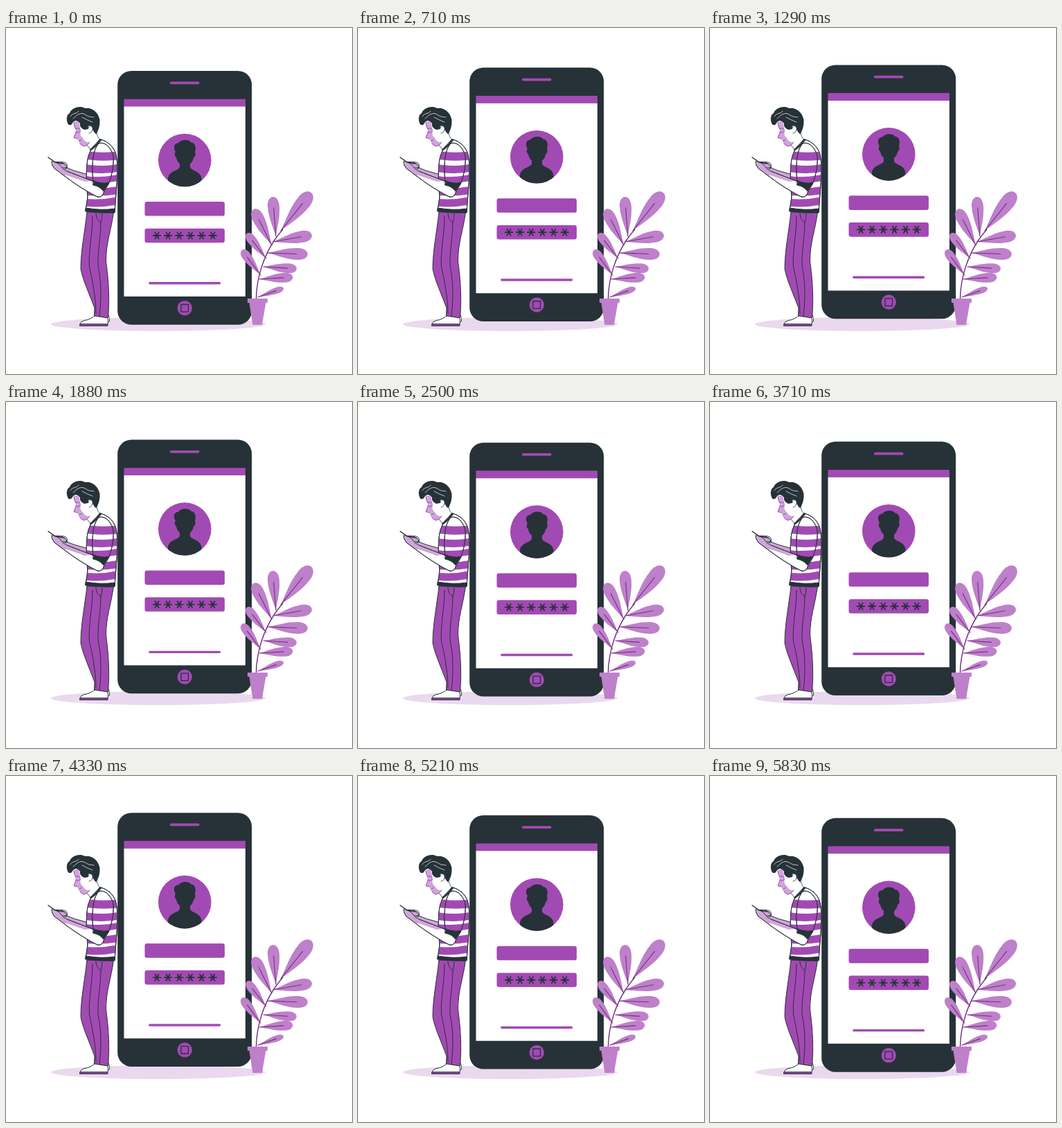
These frames come from a looping animation (500 px wide and 500 px high, 5.87 s). An HTML page:

```html
<!DOCTYPE html>
<html lang="en">
<head>
<meta charset="utf-8">
<title>Login screen</title>
<style>
  html, body { margin: 0; height: 100%; overflow: hidden; background: #fff; }
  svg { display: block; width: 100vw; height: 100vh; }
  .dark { fill: #263238; }
  .main { fill: #a24ab3; }
  .tint { fill: #d0a5d9; }
  .leaf { fill: #be80ca; }
  .white { fill: #fff; }
  .ink { stroke: #263238; stroke-linecap: round; stroke-linejoin: round; }
  .line { fill: none; }
  .vein { fill: none; stroke: #743080; stroke-width: 1.1; stroke-linecap: round; }
</style>
</head>
<body>
<svg viewBox="0 0 500 500">
  <defs>
    <clipPath id="disc"><circle cx="258.3" cy="191" r="38.3"/></clipPath>
    <clipPath id="torsoClip"><path id="torso" d="M136 161C146 163 156 171 159 183C162 196 161 216 159 240L157 266Q136 268 115 264L118 244C116 226 115 200 119 185L123 175Z"/></clipPath>
    <clipPath id="sleeveClip"><path id="sleeve" d="M134 167C143 163 153 174 155 186C156 202 152 215 148 226L126 222C124 205 124 176 134 167Z"/></clipPath>
    <g id="stripes" fill="none" stroke="#a24ab3">
      <path stroke-width="12" d="M112 183Q138 188 164 184"/>
      <path stroke-width="11" d="M112 202Q138 207 164 202"/>
      <path stroke-width="9" d="M112 218Q138 222 164 216"/>
      <path stroke-width="11" d="M112 236Q138 239 164 234M112 252Q138 255 164 249"/>
    </g>
  </defs>

  <ellipse cx="220" cy="428" rx="155" ry="10" fill="#ead9ee"/>

  <g id="phone">
    <rect class="dark" x="161.2" y="62" width="194" height="366.8" rx="20"/>
    <rect class="main" x="237" y="77.4" width="42.5" height="3.8" rx="1.9"/>
    <path class="white" d="M170.5 113H346V388H170.5Z"/>
    <path class="main" d="M170.5 102.7H346V113.5H170.5Z"/>
    <circle class="main" cx="258.3" cy="191" r="38.3"/>
    <path class="dark" clip-path="url(#disc)" d="M234 232V218C235 206 249 207 251 201V196C248 194 246.500 190 246 187C243 185 243.500 181 245 179C241 173 243 166 249 166.500C252 161 264 160 267 165C274 166 275 173 273 179C274.500 182 273.500 186 271 187.500C270.500 191 269 194 266 196.500V201C268 207 281.500 206 282.500 218V232Z"/>
    <rect class="main" x="200.5" y="250.900" width="115.500" height="20.700" rx="3.2"/>
    <rect class="main" x="200.5" y="289.700" width="115.500" height="20.600" rx="3.2"/>
    <path id="stars" class="ink line" stroke-width="1.8"/>
    <rect class="main" x="206.2" y="367.1" width="104" height="3.4" rx="1.7"/>
    <circle class="main" cx="258.3" cy="404.8" r="10.6"/>
    <path class="ink line" stroke-width="1.3" d="M253 399.500H263.500V410.100H253Z"/>
  </g>

  <g id="plant">
    <path class="vein" style="stroke-width:1.4" d="M361.500 392C362 358 374 328 387 308Q393 299 400 291"/>
    <path class="leaf" d="M349 391H378V397H375.500L370 429H356.500L351.500 397H349Z"/>
  </g>

  <g class="ink" stroke-width="1">
    <!-- shoes and trousers -->
    <path class="white" d="M145 411Q150 414 149.500 424L142 427Z"/>
    <path class="main" d="M117 266H155.500C152 293 144.500 310 144.500 337C147 356 150 382 148 413L147 419L127.500 416L128 405C121 385 111 365 108 348C108 322 114 294 117 266Z"/>
    <path class="line" d="M125 272C125 299 119 322 120.500 345C125 366 130 390 130 413M137 280C137 304 132 324 133 344C138 367 138 391 135 417M130 268Q130 277 137 281Q139 276 139 269"/>
    <path class="white" d="M128 416L147 419Q148 424 147 428H107Q107 425 112 423Q123 421 128 416Z"/>
    <path class="main" d="M107 428H147V430.500H107Z"/>

    <!-- far arm -->
    <path class="tint" d="M119 212L98 206L88 202L82 207L118 222Z"/>

    <!-- neck and face -->
    <path class="white" stroke-width=".8" d="M116 168L123 177L137 162Q131 158 131 149L121 146Z"/>
    <path class="white" stroke="none" d="M98 136Q98 142 101 146Q101 152 98 158.500L103 160L105 164Q107 170 113 171Q119 170 123 163L127 149L117 137L105 132Z"/>
    <path class="tint" stroke="none" d="M98 136Q98 142 101 146Q101 152 98 158.500L103 160L105 164Q107 170 113 171Q118 170 121 165Q114 166 111 159Q106 156 108 148L105 134Z"/>
    <path class="line" stroke="#8f3da0" stroke-width=".9" d="M98 137Q98 142 101 146M101 150Q104 153 107.500 149M101 145.500Q104 143.500 106.500 146M101 151L98 158.500L103 160M106 163L109 161.500M107 167Q109 170 113 171Q118 170 121 165"/>

    <!-- hair -->
    <path class="dark" stroke="none" d="M90 139.500C86 132 88 125 92 123C94 116 106 111 114 116C125 114 134 123 135.500 133C136 143 133 149 130 153.500C127 151 125 147 124 143C120 139 118 142 119 146L113 147Q106 144 107 138Q102 131 97 136Q94 142 90 139.500Z"/>
    <path class="line" stroke="#fff" stroke-width=".7" d="M93 128C96 122 102 125 105 120M97 131C104 124 109 121 116 126C120 129 123 128 127 129M110 129Q117 133 125 136"/>
    <path class="white" stroke-width=".8" d="M119 145C120 139 126 141 125 147Q124 152 120 152"/>

    <!-- shirt -->
    <use href="#torso" class="white"/>
    <use href="#stripes" clip-path="url(#torsoClip)"/>
    <use href="#torso" class="line"/>
    <path class="dark" d="M115.500 260Q137 264 157.500 261L157 267Q136 268 115 265Z"/>
    <path class="line" stroke-width="2.4" d="M122.500 176Q130 171 137 161.500"/>

    <!-- near arm, hands and handset -->
    <path class="white" d="M127 222L88 207L81 204L88 202Q90 196 84 194L66 193Q66 198 70 203L82 212Q108 232 132 244Q139 246 142 236L148 226Z"/>
    <path class="tint" stroke="none" d="M67 193.500L84 194.500Q89 197 87.500 202L81 204L88 207.500L122 221L114 222L88 213L84 213L70 202.500Z"/>
    <path class="line" d="M66 193Q66 198 70 203L82 212Q108 232 132 244Q139 246 142 236M127 222L88 207M72 194Q78 196 81 202L88 202M79 194Q87 196 88 202"/>
    <path class="line" stroke-width="1.5" d="M61 187L71 194L83 196"/>
    <use href="#sleeve" class="white"/>
    <use href="#stripes" clip-path="url(#sleeveClip)"/>
    <use href="#sleeve" class="line"/>
    <path class="dark" d="M126.500 221Q138 226 149 223L141 236Q136 229 126 227Z"/>
  </g>
</svg>
<script>
const add = (parent, cls, d, transform) => {
  const path = document.createElementNS("http://www.w3.org/2000/svg", "path");
  path.setAttribute("class", cls);
  path.setAttribute("d", d);
  path.setAttribute("transform", transform);
  parent.append(path);
};

// Each leaf: base x, base y, tip x, tip y, width
const leaves = [
  [397, 293, 441, 238, 21], [390, 301, 385.500, 244, 17], [384, 314, 358, 262, 17],
  [376, 333, 348, 297, 13], [368, 357, 341, 321, 13], [386, 309, 442, 299, 17],
  [378, 325, 436, 327, 17], [372, 345, 420, 348, 14], [366, 363, 414.500, 360, 14],
  [364, 389, 401, 376, 9]
];
const plant = document.getElementById("plant");
for (const [x, y, tx, ty, w] of leaves) {
  const len = Math.hypot(tx - x, ty - y), h = w / 2;
  const place = `translate(${x} ${y}) rotate(${Math.atan2(ty - y, tx - x) * 180 / Math.PI})`;
  const a = len * .3, b = len * .5, c = len * .76, e = len * 1.08;
  add(plant, "leaf", `M0 0C${a} ${-w / 4} ${b} ${-h} ${c} ${-h}C${e} ${-h} ${e} ${h} ${c} ${h}C${b} ${h} ${a} ${w / 4} 0 0`, place);
  add(plant, "vein", `M0 0H${len * .72}`, place);
}

// Six password asterisks
let stars = "";
for (let i = 0; i < 6; i++) {
  for (let k = 0; k < 3; k++) {
    const dx = 5.3 * Math.cos(k * Math.PI / 3), dy = 5.3 * Math.sin(k * Math.PI / 3);
    stars += `M${218 + i * 16.16 - dx} ${300 - dy}l${2 * dx} ${2 * dy}`;
  }
}
document.getElementById("stars").setAttribute("d", stars);

// The phone floats up and down by 10 units at constant speed
const LOOP = 5870, HALF = 1500;
const phone = document.getElementById("phone");
const start = performance.now();
function frame() {
  const t = (performance.now() - start) % LOOP;
  const lift = 10 * (1 - Math.abs(t % (2 * HALF) / HALF - 1));
  phone.setAttribute("transform", `translate(0 ${-lift})`);
  requestAnimationFrame(frame);
}
frame();
</script>
</body>
</html>
```
